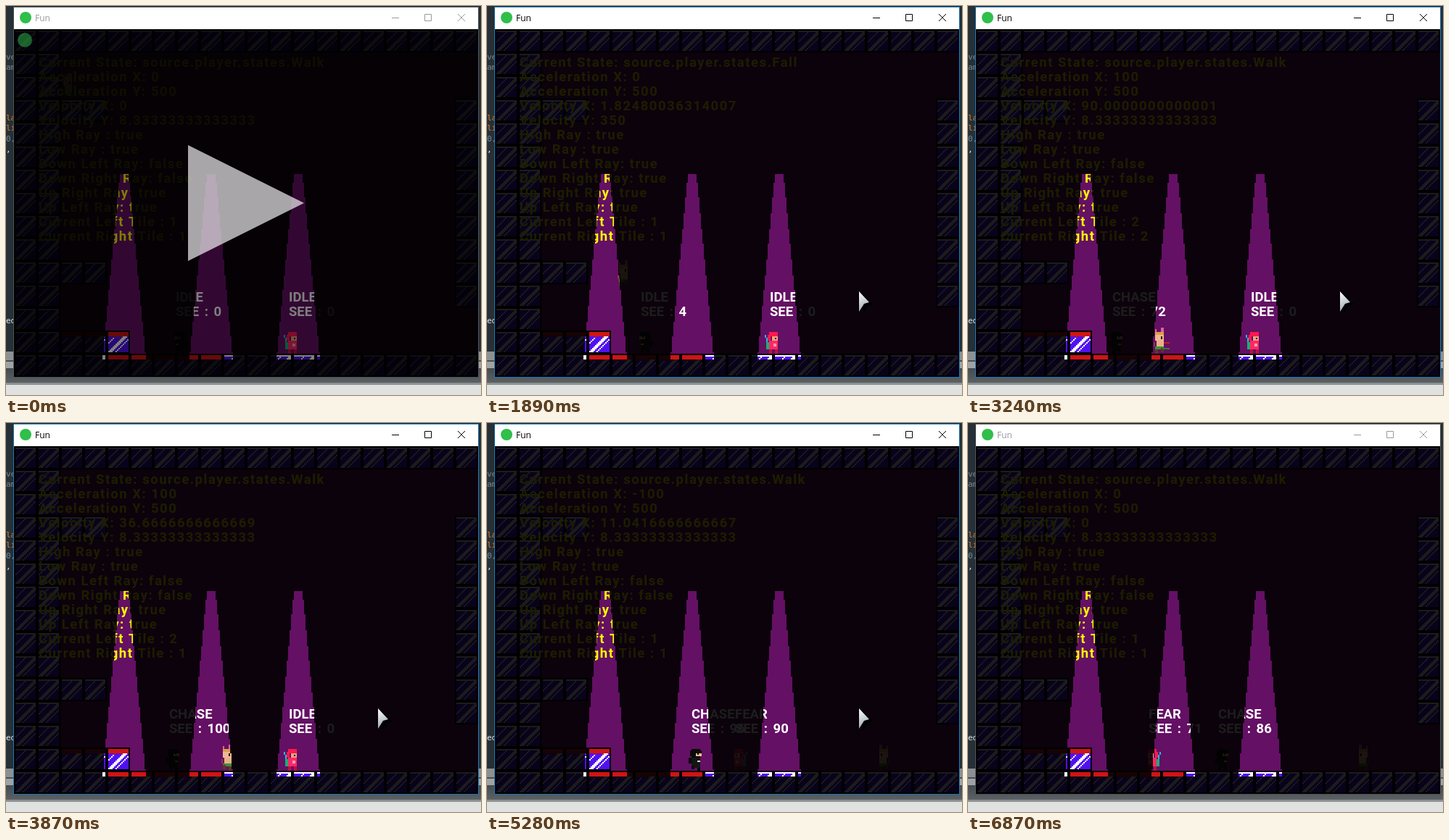
Recreate the animation shown at these times as an HTML page with a canvas. Size 655 by 537 pixels, loop 6930 ms.

```html
<!DOCTYPE html>
<html lang="en">
<head>
<meta charset="utf-8">
<title>Fun</title>
<style>
html, body { margin: 0; width: 100%; height: 100%; overflow: hidden; background: #263036; }
canvas { display: block; }
</style>
</head>
<body>
<canvas id="stage" width="655" height="537"></canvas>
<script>
const ctx = document.getElementById('stage').getContext('2d');
const LOOP = 6930, STEP = 30, TILE = 32;
const LEFT = 11, TOP = 32, WIDTH = 640, HEIGHT = 480, FLOOR = 480;
const LEDGE = 128, FALL_START = 1170;
const FONT = 'bold 18.5px Roboto, sans-serif';

// start, x, speed, change of speed, displayed acceleration
const MOVES = [
  [0, 85, 0, 0, 0],
  [450, 85, 1 / 3, 100, 100],
  [FALL_START, 134, 73.82480036314007, -100, 0],
  [1920, 185, 0, 0, 0],
  [2340, 183, 1e-13, 100, 100],
  [3390, 292, 0, 0, 0],
  [3510, 292, 0.6666666666669, 100, 100],
  [4920, 492, 141.5416666666667, -362.5, -100],
  [5280, 547, 11.0416666666667, -100, -100],
  [5640, 545, 0, 0, 0]
];

// Characters are built from blocks: colour, x, y, width, height (origin at the feet)
const HERO = [
  ['#e85aa0', -3, -17, 1, 2], ['#e85aa0', 1, -18, 2, 3], ['#d9a04a', -3, -15, 6, 2],
  ['#f0b890', -3, -13, 6, 4], ['#201010', 1, -12, 1, 2], ['#e8b088', -2, -9, 5, 4],
  ['#8a3a3a', -4, -8, 1, 3], ['#3f8f35', -3, -5, 6, 2], ['#5a3a20', -3, -3, 2, 3], ['#5a3a20', 1, -3, 2, 3]
];
const SWORD = [['#c02020', 3, -8, 4, 1], ['#2f7f2f', 2, -4, 5, 1]];
const NINJA = [
  ['#0a0a0a', -3, -15, 6, 6], ['#0a0a0a', -4, -14, 8, 4], ['#f0b890', 0, -12, 4, 2],
  ['#0a0a0a', 1, -12, 1, 1], ['#151515', -3, -9, 6, 7], ['#0a0a0a', -5, -9, 2, 4],
  ['#d8d8d8', 1, -7, 2, 1], ['#0a0a0a', -3, -2, 2, 2], ['#0a0a0a', 1, -2, 2, 2]
];
const ARCHER = [
  ['#20b8e0', -6, -13, 1, 2], ['#20b8e0', -5, -11, 1, 3], ['#18b070', -5, -8, 2, 5],
  ['#ff1850', -3, -15, 6, 3], ['#ff1850', -4, -13, 2, 4], ['#f0a080', -1, -12, 4, 3],
  ['#301010', 1, -11, 1, 1], ['#ff2868', -3, -9, 6, 6], ['#ffa0a8', 0, -7, 2, 2],
  ['#c01040', -3, -3, 2, 3], ['#c01040', 1, -3, 2, 3]
];

const rect = (color, x, y, w, h, c = ctx) => { c.fillStyle = color; c.fillRect(x, y, w, h); };

function text(value, x, y, color, font = FONT, letter = 0, word = 0) {
  ctx.font = font;
  ctx.letterSpacing = letter + 'px';
  ctx.wordSpacing = word + 'px';
  ctx.fillStyle = color;
  ctx.fillText(value, x, y);
}

function track(t, keys) {
  const next = keys.findIndex(k => k[0] > t);
  if (next < 0) return keys[keys.length - 1][1];
  if (next === 0) return keys[0][1];
  const [t0, a] = keys[next - 1], [t1, b] = keys[next];
  return a + (b - a) * (t - t0) / (t1 - t0);
}

function isWall(col, row) {
  return row === 0 || row === 14 || col < 2
    || (col === 19 && row >= 3 && row <= 11)
    || ((row === 3 || row === 10) && col < 4)
    || (row === 13 && col < 5);
}

const isBloody = (col, row) =>
  (row === 13 && col >= 2 && col <= 4) || (row === 14 && col >= 4 && col <= 8);

function tile(c, col, row) {
  const x = col * TILE, y = row * TILE;
  rect('#000', x, y, TILE, TILE, c);
  for (let i = 1; i < 15; i++) {
    for (let j = 1; j < 15; j++) {
      const s = i + j;
      let color = s === 9 || (s > 14 && s < 18) || s === 20 ? '#fff' : '#5010f0';
      if (j === 1) color = '#fff';
      if (isBloody(col, row) && j < 4 + (i * 7 % 5 === 0)) color = '#d01414';
      rect(color, x + i * 2, y + j * 2, 2, 2, c);
    }
  }
}

const room = document.createElement('canvas');
room.width = WIDTH;
room.height = HEIGHT;
{
  const c = room.getContext('2d');
  rect('#641064', 0, 0, WIDTH, HEIGHT, c);
  for (let row = 0; row < 15; row++)
    for (let col = 0; col < 20; col++)
      if (isWall(col, row)) tile(c, col, row);
}

// Everything except the three stepped light cones
const darkness = new Path2D();
darkness.rect(LEFT, TOP, WIDTH, HEIGHT);
for (const center of [163, 283, 403]) {
  for (let y = 232; y < 488; y += 2) {
    const half = 6 + 2 * Math.round(12 * (y - 232) / 256);
    darkness.rect(center - half, y, half * 2, 2);
  }
}

function sprite(parts, x, feet, facing, stride = 0) {
  ctx.save();
  ctx.translate(Math.round(x), Math.round(feet));
  ctx.scale(2 * facing, 2);
  for (const [color, px, py, w, h] of parts) {
    const lift = py >= -3 && px * stride > 0 ? 1 : 0;
    rect(color, px, py - lift, w, h);
  }
  ctx.restore();
}

function label(state, see, x) {
  text(state, Math.round(x), 408, '#fff');
  text('SEE : ' + Math.floor(see), Math.round(x), 428, '#fff', FONT, 0, 3);
}

function heroAt(t) {
  const [start, x, speed, rate, accel] = MOVES.filter(m => m[0] <= t).pop();
  const dt = (t - start) / 1000;
  const air = Math.max(0, t - FALL_START) / 1000;
  const drop = air < 0.7 ? 250 * air * air : 122.5 + 350 * (air - 0.7);
  const y = Math.min(FLOOR, LEDGE + 2 * drop);
  return {
    x: x + 2 * (speed * dt + rate * dt * dt / 2), y, accel,
    vx: speed + rate * dt,
    vy: y > LEDGE && y < FLOOR ? Math.min(350, 500 * air) : 25 / 3,
    falling: y > LEDGE && y < FLOOR
  };
}

const digits = v => String(Number(v.toPrecision(15)));

function debugText(hero) {
  const onBlood = x => hero.y === FLOOR && x < 300 ? 2 : 1;
  [
    'Current State: source.player.states.' + (hero.falling ? 'Fall' : 'Walk'),
    'Acceleration X: ' + hero.accel,
    'Acceleration Y: 500',
    'Velocity X: ' + digits(hero.vx),
    'Velocity Y: ' + digits(hero.vy),
    'High Ray : true',
    'Low Ray : true',
    'Down Left Ray: ' + hero.falling,
    'Down Right Ray: ' + hero.falling,
    'Up Right Ray: true',
    'Up Left Ray: true',
    'Current Left Tile : ' + onBlood(hero.x - 8),
    'Current Right Tile : ' + onBlood(hero.x + 8)
  ].forEach((line, i) => text(line, 45, 84 + i * 20, '#ff0', FONT, 1.5));
}

function desktop() {
  rect('#263036', 0, 0, 655, 537);
  rect('#8d9092', 0, 477, 655, 12);
  rect('#4a4f52', 0, 489, 655, 2);
  rect('#a0a3a4', 0, 491, 655, 9);
  const shade = ctx.createLinearGradient(0, 500, 0, 521);
  shade.addColorStop(0, '#454b4e');
  shade.addColorStop(1, '#5c6265');
  rect(shade, 0, 500, 655, 21);
  rect('#8d9192', 0, 520, 655, 3);
  rect('#dfe2e0', 0, 523, 655, 14);
  const mono = '11px "DejaVu Sans Mono", monospace';
  [['ve', 74, '#7b878c'], ['am', 88, '#7b878c'], ['la', 158, '#e08030'], ['li', 172, '#e08030'],
    ['0,', 187, '#6f8ba0'], [',', 202, '#e8e8e8'], ['ed', 438, '#e8e8e8']]
    .forEach(([s, y, color]) => text(s, 0, y, color, mono));
}

function dot(x, y, r) {
  ctx.fillStyle = '#2fbf4a';
  ctx.beginPath();
  ctx.arc(x, y, r, 0, 7);
  ctx.fill();
}

function windowFrame(active) {
  rect(active ? '#1878c0' : '#4d5357', 10, 1, 642, 512);
  rect('#fff', 11, 2, 640, 30);
  dot(27, 16, 8);
  const ink = active ? '#000' : '#999';
  text('Fun', 40, 21, ink, '12px "Open Sans", sans-serif');
  ctx.strokeStyle = ink;
  ctx.lineWidth = 1;
  ctx.beginPath();
  ctx.moveTo(532, 16.5); ctx.lineTo(542, 16.5);
  ctx.rect(577.5, 11.5, 9, 9);
  ctx.moveTo(623, 11); ctx.lineTo(633, 21);
  ctx.moveTo(633, 11); ctx.lineTo(623, 21);
  ctx.stroke();
}

function polygon(color, ...points) {
  ctx.fillStyle = color;
  ctx.beginPath();
  points.forEach(([x, y]) => ctx.lineTo(x, y));
  ctx.fill();
}

function cursor(t) {
  if (t < 300 || t >= 6720) return;
  const x = track(t, [[300, 651], [660, 513], [6390, 513], [6720, 651]]);
  const y = track(t, [[300, 300], [660, 394], [6390, 394], [6720, 171]]);
  ctx.save();
  ctx.translate(x, y);
  polygon('rgba(0,0,0,.85)', [5, 3], [20, 18], [13, 19], [6, 29]);
  const steel = ctx.createLinearGradient(0, 0, 10, 22);
  steel.addColorStop(0, '#fff');
  steel.addColorStop(1, '#a9b4bd');
  polygon(steel, [0, 0], [14, 15], [7, 17], [0, 28]);
  ctx.restore();
}

function game(t) {
  const hero = heroAt(t);
  const stride = Math.floor(t / 120) % 2 ? 1 : -1;
  const ninjaX = track(t, [[700, 240], [930, 238], [1890, 218], [2540, 204], [3210, 204], [4470, 255], [5280, 288], [6870, 351]]);
  const ninjaSee = track(t, [[1810, 0], [3240, 72], [3800, 100], [4900, 100], [5280, 96], [6870, 86]]);
  const chasing = t >= 2820;
  const scared = t >= 4500;
  const archerX = track(t, [[4480, 395], [5280, 347], [6870, 254]]);
  const archerSee = scared ? track(t, [[4500, 100], [5280, 90], [6870, 71]]) : 0;

  ctx.save();
  ctx.beginPath();
  ctx.rect(LEFT, TOP, WIDTH, HEIGHT);
  ctx.clip();
  ctx.drawImage(room, LEFT, TOP);
  sprite(NINJA, ninjaX, FLOOR, chasing ? 1 : -1, t > 700 ? stride : 0);
  sprite(ARCHER, archerX, FLOOR, scared ? -1 : 1, scared ? stride : 0);
  const swinging = t >= 3180 && t < 3390;
  sprite(swinging ? HERO.concat(SWORD) : HERO, hero.x, hero.y, t >= 4920 ? -1 : 1, hero.vx ? stride : 0);
  debugText(hero);
  label(chasing ? 'CHASE' : 'IDLE', ninjaSee, ninjaX - 6);
  label(scared ? 'FEAR' : 'IDLE', archerSee, archerX - 5);
  if (t >= 4350 && t < 4770) {
    const y = 439 - (t - 4470) * 0.02;
    ctx.font = FONT;
    ctx.letterSpacing = ctx.wordSpacing = '0px';
    ctx.strokeStyle = '#000';
    ctx.lineWidth = 4;
    ctx.strokeText('SLAIN', 371, y);
    text('SLAIN', 371, y, '#fff');
  }
  ctx.globalCompositeOperation = 'multiply';
  ctx.fillStyle = '#1c1c1c';
  ctx.fill(darkness, 'evenodd');
  ctx.restore();
}

function pausedScreen() {
  rect('rgba(0,0,0,.5)', LEFT, TOP, WIDTH, HEIGHT);
  polygon('rgba(255,255,255,.65)', [251, 192], [411, 272], [251, 352]);
  ctx.globalAlpha = 0.5;
  dot(26, 47, 10);
  ctx.globalAlpha = 1;
}

function draw(now) {
  const t = Math.floor(now % LOOP / STEP) * STEP;
  desktop();
  windowFrame(t >= 300 && t < 6780);
  game(t);
  if (t < 300) pausedScreen();
  cursor(t);
  requestAnimationFrame(draw);
}
requestAnimationFrame(draw);
</script>
</body>
</html>
```
